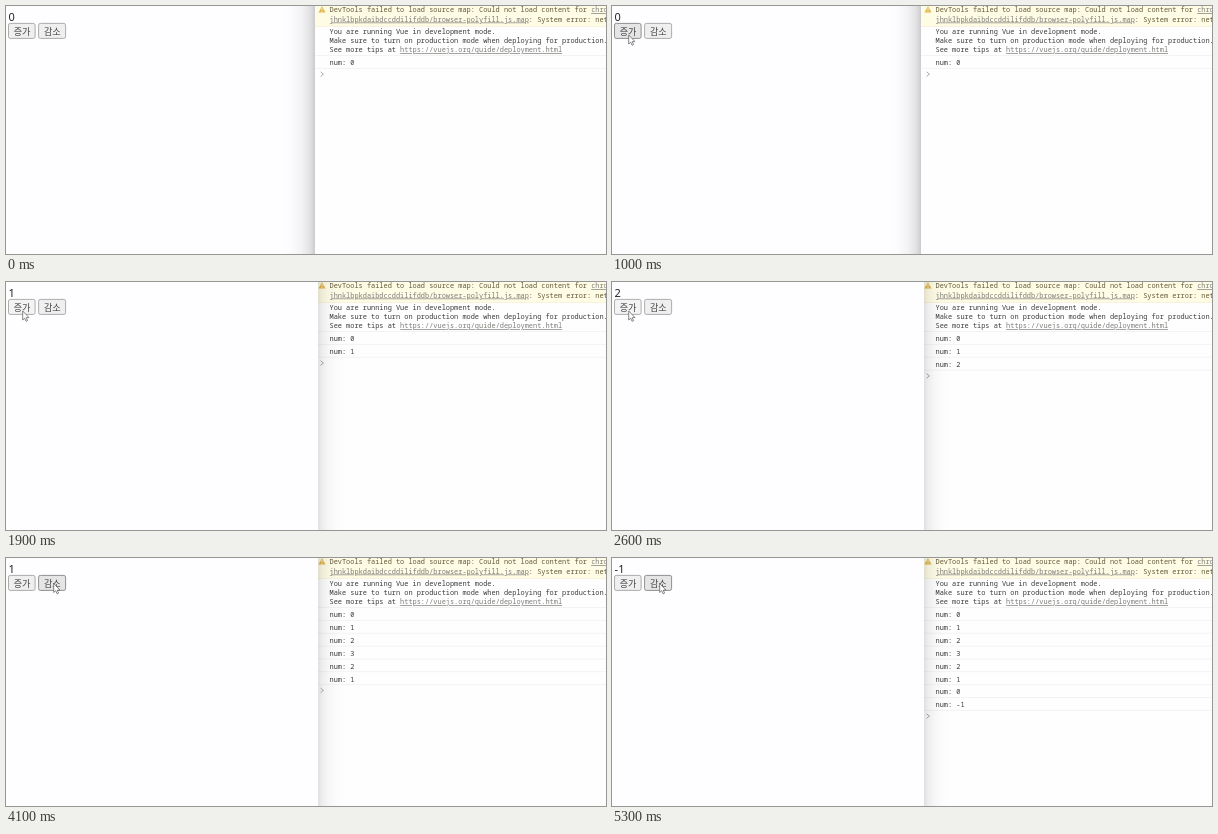
An HTML page that plays this animation: 600 px wide and 248 px high, repeating every 6.2 s.

```html
<!DOCTYPE html>
<html lang="ko">
<head>
<meta charset="utf-8">
<style>
  html, body { margin: 0; width: 100%; height: 100%; overflow: hidden; background: #fff; }
  svg { display: block; }
  .console text { font: 6.93px "Noto Sans Mono", monospace; fill: #3a3a3a; white-space: pre; }
  .console .warn { fill: #615838; }
  .console .link { fill: #7c7c78; text-decoration: underline; }
  .rule { stroke: #f3f3f3; }
  #count { font: 11px "Noto Sans", sans-serif; fill: #222; }
  .button rect { fill: #efefef; stroke: #9a9a9a; stroke-width: .8; }
  .button text { font: 9.1px "Noto Sans CJK KR", "Noto Sans CJK", sans-serif; text-anchor: middle; fill: #444; }
  .button.hover rect { fill: #e5e5e5; stroke: #777; }
  .button.press rect { fill: #f3f3f3; stroke: #9c9c9c; }
</style>
</head>
<body>
<svg width="600" height="248" viewBox="0 0 600 248">
  <defs>
    <linearGradient id="fade">
      <stop offset="0" stop-opacity=".2"/>
      <stop offset=".15" stop-opacity=".11"/>
      <stop offset=".4" stop-opacity=".045"/>
      <stop offset=".7" stop-opacity=".012"/>
      <stop offset="1" stop-opacity="0"/>
    </linearGradient>
  </defs>

  <g class="console">
    <rect x="309" width="291" height="248" fill="#fffeff"/>
    <rect x="309" width="291" height="21" fill="#fffce6"/>
    <path d="M309 20.5H600" stroke="#f8f3da"/>
    <path d="M316 .3L319.5 6.5H312.5Z" fill="#e0b548"/>
    <path d="M316 2.3V4.3M316 5V5.8" stroke="#fff" stroke-width=".9"/>
    <text class="warn" x="323.5" y="6.2">DevTools failed to load source map: Could not load content for <tspan class="link">chrome-extension://</tspan></text>
    <text class="warn" x="323.5" y="15.5"><tspan class="link">jhnklbpkdaibdccddilifddb/browser-polyfill.js.map</tspan>: System error: net::ERR</text>
    <text x="323.5" y="27.6">You are running Vue in development mode.</text>
    <text x="323.5" y="36.9">Make sure to turn on production mode when deploying for production.</text>
    <text x="323.5" y="46.2">See more tips at <tspan class="link">https://vuejs.org/guide/deployment.html</tspan></text>
    <path class="rule" d="M309 49.5H600"/>
    <g id="log"></g>
    <path id="prompt" d="M314.6 -2.3L317.4 0L314.6 2.3" fill="none" stroke="#a5a9b4"/>
  </g>

  <rect id="shadowRight" x="312" width="28" height="248" fill="url(#fade)" opacity=".6"/>
  <rect id="page" width="309" height="248" fill="#fefdff"/>
  <rect id="shadowLeft" width="33" height="248" fill="url(#fade)" transform="matrix(-1 0 0 1 309 0)"/>

  <text id="count" x="2.6" y="15.2"></text>
  <g id="plus"><rect x="2.5" y="17.4" width="26.6" height="15" rx="1.8"/><text x="16" y="28.5">증가</text></g>
  <g id="minus"><rect x="32.6" y="17.4" width="27" height="15" rx="1.8"/><text x="46.3" y="28.5">감소</text></g>
  <path id="cursor" d="M0 0V9L2 7.2L3.4 10.3L4.9 9.6L3.5 6.7L6.2 6.5Z" fill="#fff" stroke="#555" stroke-width=".7"/>
</svg>
<script>
  const LOOP = 6200, STEP = 100, ROW = 12.85;
  const values = [0, 1, 2, 3, 2, 1, 0, -1];
  const logTimes = [0, 1200, 2000, 2700, 3500, 4100, 4700, 5300];
  const presses = [[1100, 1300], [1900, 2000], [2600, 2700], [3300, 3500], [4000, 4100], [4600, 4700], [5200, 5300]];
  const entry = [316, 219], onPlus = [16.7, 29], onMinus = [47.7, 25.5];

  const el = id => document.getElementById(id);
  const clamp = x => Math.min(1, Math.max(0, x));
  const mix = (a, b, k) => a.map((v, i) => v + (b[i] - v) * k);
  const show = (id, on) => el(id).setAttribute("visibility", on ? "visible" : "hidden");

  el("log").innerHTML = values.map((v, i) =>
    `<g><text x="323.5" y="${59.3 + i * ROW}">num: ${v}</text>` +
    `<path class="rule" d="M309 ${62.4 + i * ROW}H600"/></g>`).join("");

  function cursorAt(t) {
    if (t >= 2900) return mix(onPlus, onMinus, clamp((t - 2800) / 300));
    const k = clamp((t - 200) / 600);
    return mix(entry, onPlus, 1 - (1 - k) ** 2);
  }

  function render(t) {
    const count = logTimes.filter(at => t >= at).length;
    [...el("log").children].forEach((row, i) => row.setAttribute("visibility", i < count ? "visible" : "hidden"));
    el("prompt").setAttribute("transform", `translate(0 ${68.2 + (count - 1) * ROW})`);
    el("count").textContent = values[count - 1];

    const pageActive = t >= 1100;
    el("page").setAttribute("width", pageActive ? 312 : 309);
    show("shadowRight", pageActive);
    show("shadowLeft", !pageActive);

    show("cursor", t >= 200);
    el("cursor").setAttribute("transform", `translate(${cursorAt(t)})`);

    const pressed = presses.some(([from, to]) => t >= from && t < to);
    const state = hover => "button" + (hover ? pressed ? " press" : " hover" : "");
    el("plus").setAttribute("class", state(t >= 800 && t < 2900));
    el("minus").setAttribute("class", state(t >= 3000));
  }

  function tick() {
    const t = performance.now() % LOOP;
    render(Math.floor(t / STEP) * STEP);
    requestAnimationFrame(tick);
  }
  tick();
</script>
</body>
</html>
```
